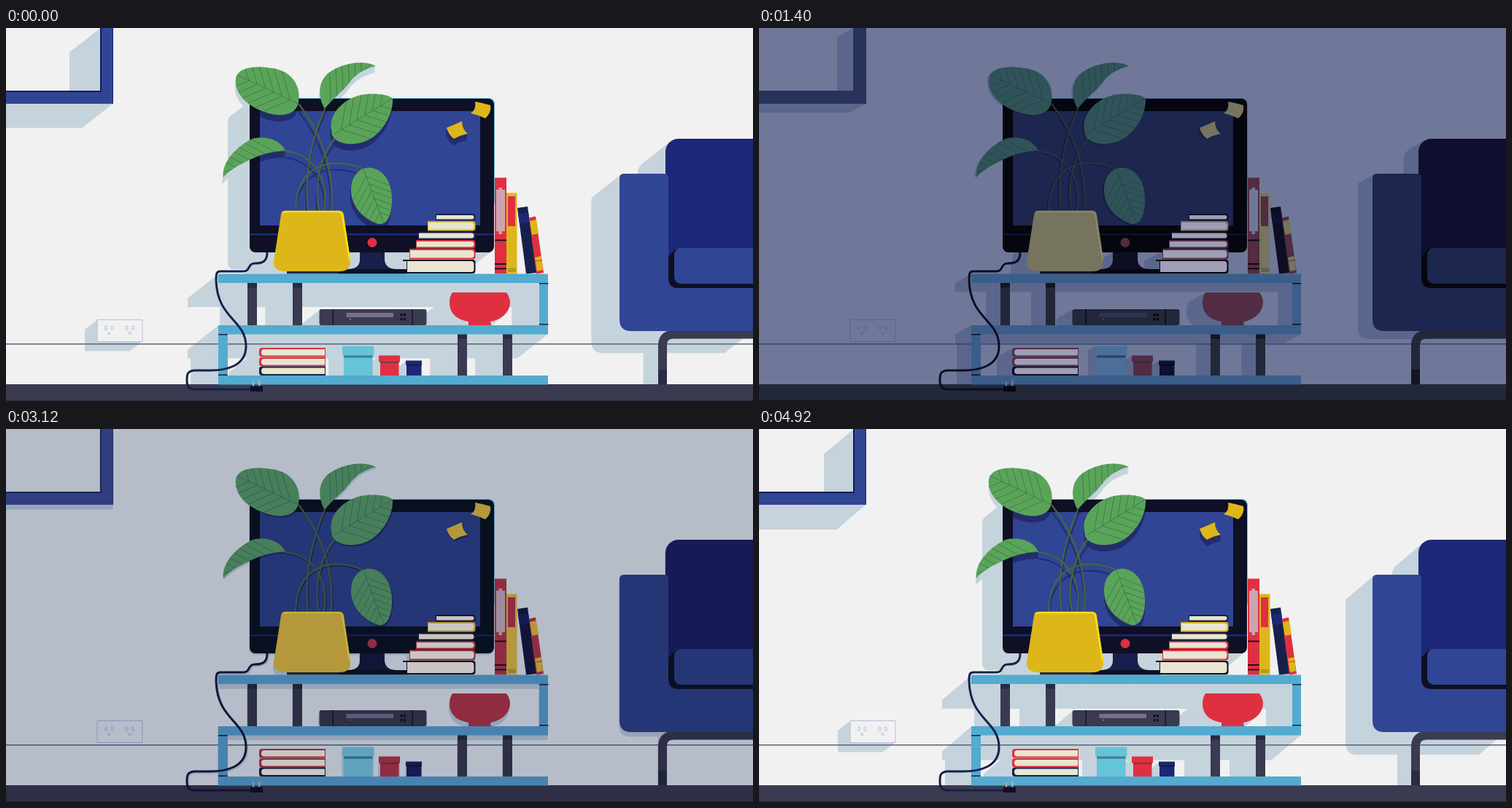
Recreate the animation shown at these times as an HTML page with a canvas. Size 1024 by 512 pixels, loop 5.04 s.

```html
<!DOCTYPE html>
<html lang="en">
<head>
<meta charset="utf-8">
<title>Living room, day and night</title>
<style>
html, body { margin: 0; width: 100%; height: 100%; overflow: hidden; }
canvas { display: block; width: 100vw; height: 100vh; }
</style>
</head>
<body>
<canvas width="1024" height="512"></canvas>
<script>
const g = document.querySelector('canvas').getContext('2d');
const LOOP = 5040, FRAMES = 51;

// day, dusk, night
const palette = {
  wall: 'f1f1f1 a2abbb 6f7898', shadow: 'c5d3dc 8495ae 5b668d',
  blue: '314595 21316b 1c264e', navy: '1c2877 14174b 0f0f2f',
  dark: '0f0f25 07101d 05060f', yellow: 'ddb71a a58d46 76745f',
  glow: 'f7e018 b8a545 8a8664', red: 'df3041 752b41 512c42',
  green: '5aa45a 42725b 305358', vein: '3f7a45 2b5552 24414f',
  stem: '46683a 354c3c 25353f', teal: '53abd0 4375a5 3a5d89',
  cyan: '66c4d7 5c97b3 4b6f99', slate: '3a3a50 2a2b43 222739',
  cap: '292a43 1c2232 131523', cream: 'e8e6cf bfb9bd a09db6',
  ink: '17204c 10112f 0d0e22', line: '5a6577 414f66 364468',
  mauve: 'cba4b0 8f8598 6f7898', shade: '232d6d 192252 161c3f',
  trim: 'b9bcdc 7e86ac 5b6690', frame: '314595 2f3a76 28325c',
  rim: '101c57 1d2f50 28325c', display: '756f8c 4c5272 2c3357',
  led: '9a8fa0 8f3046 a03a50', lid: '3f7a9a 31597d 2a4168'
};
for (const k in palette)
  palette[k] = palette[k].split(' ').map(h => [0, 2, 4].map(i => parseInt(h.slice(i, i + 2), 16)));

// shadow reach: step, dx, dy
const reach = {
  far: [[0, -42, 33], [7, -42, 26], [14, -22, 12], [22, 0, 0], [28, 0, 0], [30, 0, 2], [36, -3, 16.5], [50, -40, 34], [51, -42, 33]],
  mid: [[0, -30, 23], [7, -26, 16], [14, 0, 0], [29, 0, 0], [36, -2, 5], [50, -28, 23], [51, -30, 23]],
  near: [[0, -17, 13], [7, -10, 6], [14, 0, 0], [38, 0, 0], [50, -17, 13], [51, -17, 13]],
  leaf: [[0, -1, 9], [7, -2, 5], [14, -2, 1], [22, 0, 0], [28, 0, 0], [30, 0, 1], [36, 4, 5], [50, 0, 9], [51, -1, 9]],
  cord: [[0, 0, 0], [30, 0, 0], [36, 5, 5], [44, 0, 0], [51, 0, 0]]
};

const P = d => new Path2D(d);
const R = (x, y, w, h, r = 0) => { const p = new Path2D(); p.roundRect(x, y, w, h, r); return p; };

const frame = P('M0 0H147V104H0V86H129V0Z');
const outlet = R(125, 400.5, 62, 30);
const tv = R(334, 97, 335, 211, 8), screen = R(348, 114, 302, 157);
const stand = P('M485 308H519V318Q520 331 536 331H470Q485 330 485 318Z');
const pot = P('M383 251H457Q462 251 463 256L472 318Q473 334 458 334H381Q366 333 367 320L377 256Q378 251 383 251Z');
const bowl = P('M612 363H686Q691 370 691 377C690 393 676 401 664 403L665 408H634V403C616 400 608 390 608 377Q608 369 612 363Z');
const player = R(429.5, 386, 147, 22, 3);
const boards = [337.5, 408, 477].map(y => R(291, y, 452, 12.5));
const sides = [R(731, 349, 12, 60), R(291, 420, 13, 58)];
const legs = [[331, 350], [393, 350], [619, 420], [681, 420]];
const legShapes = legs.map(([x, y]) => R(x, y, 13, 58));
const back = R(904, 152, 160, 200, 18);
const body = P('M847 200H902Q908 200 908 206V340H1024V416H857Q841 416 841 400V206Q841 200 847 200Z');
const cord = P('M358 308C358 320 352 323 342 323C330 323 336 334 325 334H294C288 334 288 338 288 347C290 400 329 400 329 437C329 465 300 470 280 470H258C248 471 248 476 248 484C248 494 252 496 262 496H335');
const notes = [
  P('M643 101Q654 103 664 106Q666 116 657 124Q646 119 637 117Q645 112 643 101Z'),
  P('M604 137Q616 132 625 128Q625 139 633 145Q623 147 614 152Q607 147 604 137Z')
];
// outline, then midrib from base to tip
const leaves = [
  ['M315 69C319 52 345 52 364 55C390 58 405 78 401 101C399 116 385 121 369 119C340 114 312 95 315 69Z', 401, 104, 316, 64],
  ['M437 111C426 92 428 70 446 59C466 47 490 44 507 52C492 56 480 62 470 76C460 89 446 98 437 111Z', 437, 110, 500, 49],
  ['M446 140C442 118 462 98 486 92C505 89 525 91 530 97C531 115 520 137 504 149C486 163 455 163 447 147Z', 449, 146, 529, 97],
  ['M298 205C295 185 316 162 338 152C358 147 378 155 383 169C365 168 345 175 330 183C315 190 304 197 298 205Z', 382, 167, 300, 198],
  ['M510 269C490 262 472 245 473 220C474 200 488 190 501 192C520 195 530 215 529 240C528 258 522 271 510 269Z', 490, 194, 518, 268]
].map(([d, ...rib]) => ({ shape: P(d), rib }));
const stems = P('M401 104C430 140 450 190 446 251M437 111C420 150 408 200 414 251M452 150C430 175 422 220 429 251M383 169C415 172 444 200 436 251M488 193C455 178 398 180 397 251');

let C, V;

function fill(c, p) { g.fillStyle = C[c]; g.fill(p); }
function stroke(c, p, w) { g.strokeStyle = C[c]; g.lineWidth = w; g.stroke(p); }
const rect = (c, ...a) => fill(c, R(...a));

// sweeps shapes along the light direction
function cast(shapes, [dx, dy], scale = 1, c = 'shadow') {
  const steps = Math.ceil(Math.max(Math.abs(dx), Math.abs(dy)) * scale);
  for (let i = 1; i <= steps; i++) {
    g.save();
    g.translate(dx * scale * i / steps, dy * scale * i / steps);
    shapes.forEach(s => fill(c, s));
    g.restore();
  }
}

function shifted(c, p, w, [dx, dy]) {
  g.save();
  g.translate(dx, dy);
  stroke(c, p, w);
  g.restore();
}

function book(c, x1, x2, y, h, spineRight) {
  const r = spineRight ? [0, 4, 4, 0] : [4, 0, 0, 4];
  rect(c, x1, y, x2 - x1, h, r);
  rect('cream', x1 + (spineRight ? 1 : 3), y + 2, x2 - x1 - (spineRight ? 3 : 4), h - 4, r);
}

function drawShadows() {
  const { far, mid, near, leaf } = V;
  cast([frame, pot, R(550, 308, 93, 29), stand, bowl, player, ...boards, R(348, 439, 89, 38)], far);
  cast([...sides, ...legShapes], far, .9);
  cast([R(461, 437, 43, 40), R(511, 450, 29, 27), R(548, 457, 22, 20)], far, .45);
  cast([back, body], far, .92);
  cast([R(894, 421, 12, 68)], mid, .68);
  cast([tv], mid);
  cast([outlet], near);
  cast(leaves.map(l => l.shape), leaf);
  if (V.cord[1]) shifted('shadow', cord, 3, V.cord);
}

function drawWall() {
  fill('frame', frame);
  stroke('rim', P('M130 0V87H0'), 2);
  stroke('rim', P('M146.5 0V104'), .7);
  fill('wall', outlet);
  stroke('trim', outlet, 1);
  for (const x of [141, 169.5]) {
    const holes = R(x - 5.5, 409, 3, 5.5, 1.5);
    holes.addPath(R(x + 3, 409, 3, 5.5, 1.5));
    holes.addPath(R(x - 1.5, 417.5, 3.2, 3.2, 1.6));
    stroke('trim', holes, 1);
  }
}

function drawTv() {
  fill('cyan', R(335, 96, 335, 150, 8));
  fill('dark', tv);
  fill('blue', screen);
  rect('navy', 334, 282, 335, 2.5);
  rect('red', 495.5, 288, 13, 13, 6.5);
  fill('ink', stand);
  rect('dark', 456, 331, 94, 6.5);
  g.save();
  g.clip(screen);
  cast([...leaves.map(l => l.shape), ...notes.slice(1)], V.leaf, 1, 'shade');
  if (V.leaf[1]) shifted('shade', stems, 2, V.leaf);
  g.restore();
  notes.forEach(n => fill('yellow', n));
}

function drawPlant() {
  stroke('stem', stems, 2);
  for (const { shape, rib: [x1, y1, x2, y2] } of leaves) {
    fill('green', shape);
    g.save();
    g.clip(shape);
    const veins = P(`M${x1} ${y1}L${x2} ${y2}`), a = Math.atan2(y2 - y1, x2 - x1);
    for (let i = 1; i < 7; i++) {
      const x = x1 + (x2 - x1) * i / 7.5, y = y1 + (y2 - y1) * i / 7.5;
      for (const b of [a - .85, a + .85]) {
        veins.moveTo(x, y);
        veins.lineTo(x + 50 * Math.cos(b), y + 50 * Math.sin(b));
      }
    }
    stroke('vein', veins, .9);
    g.restore();
  }
  rect('cap', 385, 333, 71, 4.5);
  fill('yellow', pot);
  stroke('glow', P('M379 254Q380 252 384 252H456Q460 252 461 256L471 318'), 2.5);
}

function drawBooks() {
  [['ink', 589, 255, 9.5], ['yellow', 578, 265, 13.5], ['ink', 565, 279.5, 11],
   ['red', 562, 291, 11.5], ['red', 553, 303, 14.5], ['dark', 549, 318, 19]]
    .forEach(([c, x, y, h]) => book(c, x, 643.5, y, h, true));
  rect('dark', 544, 318, 12, 2);
  rect('red', 670, 205.5, 16, 132);
  rect('mauve', 672, 222, 12, 57);
  rect('mauve', 675.5, 219, 4.5, 64);
  for (const y of [290.5, 323, 329.5]) rect('dark', 670, y, 16, 1.8);
  rect('yellow', 686, 226.5, 14.5, 111);
  rect('red', 688, 231, 10, 41);
  for (const y of [330.5, 333]) rect('stem', 688, y, 11, .8);
  fill('ink', P('M701 247L715 245L727.5 336L713 337.5Z'));
  fill('navy', P('M702 255L716 253L718 267L704 269Z'));
  fill('red', P('M717 260.5L726 258.5L737 336L727 337.5Z'));
  fill('yellow', P('M718 265L727 263L730 282L721 284Z'));
  fill('yellow', P('M725 315L733.5 313L736 332L728 334Z'));
  stroke('red', P('M726 320L735 318.5'), 1);
}

function drawShelf() {
  legs.forEach(([x, y], i) => {
    fill('slate', legShapes[i]);
    rect('cap', x, y, 13, 6.5);
  });
  [...sides, ...boards].forEach(s => fill('teal', s));
  for (const [x, y] of [[731, 350], [731, 406], [291, 420], [291, 475.5]]) rect('ink', x, y, 12.5, 1.5);

  fill('slate', player);
  rect('dark', 447.5, 386, 1.3, 22);
  rect('dark', 556.5, 386, 1.3, 22);
  rect('display', 466.5, 391, 64.5, 6);
  rect('led', 471, 398.5, 2, 2, 1);
  for (const x of [540.5, 545]) for (const y of [392, 398]) rect('dark', x, y, 3, 3.5);
  fill('red', bowl);

  book('red', 347, 438, 439, 12.5);
  book('red', 347, 438, 452, 12.5);
  book('ink', 347, 438, 464.5, 12.5);
  rect('cyan', 463, 449, 39.5, 28);
  rect('cyan', 461, 436.5, 43.5, 13);
  rect('lid', 463, 449.5, 39.5, 3);
  rect('red', 513, 458, 25.5, 19);
  rect('red', 511, 449.5, 29, 9);
  rect('slate', 513, 458.3, 25.5, 1.2);
  rect('navy', 549, 462, 20.5, 15);
  rect('navy', 548, 456.5, 22, 6);
  rect('dark', 549, 462, 20.5, 1.2);
}

function drawSofa() {
  stroke('slate', P('M900 489V436Q900 420.5 916 420.5H1030'), 12);
  rect('cap', 894, 469, 12, 20);
  fill('navy', back);
  fill('blue', body);
  fill('dark', P('M908 314L917 304H1024V357H922Q908 357 908 343Z'));
  rect('blue', 916, 302, 130, 49, 9);
}

function drawCord() {
  stroke('ink', cord, 3);
  rect('mauve', 338, 485, 2, 7);
  rect('mauve', 346, 483.5, 2.5, 8);
  rect('dark', 335, 491.5, 17, 7.5);
}

function at(keys, n) {
  const i = keys.findIndex(k => k[0] > n), a = keys[i - 1], b = keys[i];
  const f = (n - a[0]) / (b[0] - a[0]);
  return [1, 2].map(j => a[j] + (b[j] - a[j]) * f);
}

function darkness(n) {
  if (n < 27) return Math.min(1, n / 12);
  return Math.max(0, 1 - (n - 27) / 9);
}

function mix([day, dusk, night], k) {
  const [a, b, f] = k < .6 ? [day, dusk, k / .6] : [dusk, night, (k - .6) / .4];
  return `rgb(${a.map((v, i) => Math.round(v + (b[i] - v) * f))})`;
}

function draw(n) {
  const k = darkness(n);
  C = Object.fromEntries(Object.entries(palette).map(([name, c]) => [name, mix(c, k)]));
  V = Object.fromEntries(Object.entries(reach).map(([name, keys]) => [name, at(keys, n)]));
  rect('wall', 0, 0, 1024, 512);
  drawShadows();
  rect('line', 0, 433, 1024, 1.6);
  drawWall();
  rect('slate', 0, 489, 1024, 23);
  rect('cap', 0, 511, 1024, 1);
  drawTv();
  drawPlant();
  drawBooks();
  drawShelf();
  drawSofa();
  drawCord();
}

// steps last 80 or 120 ms in turn
const start = n => 100 * n - (n < 30 ? n % 2 * 20 : 80 - n % 2 * 20);

let shown = -1;
function tick() {
  const t = performance.now() % LOOP;
  let n = FRAMES - 1;
  while (start(n) > t) n--;
  if (n !== shown) draw(shown = n);
  requestAnimationFrame(tick);
}
tick();
</script>
</body>
</html>
```
